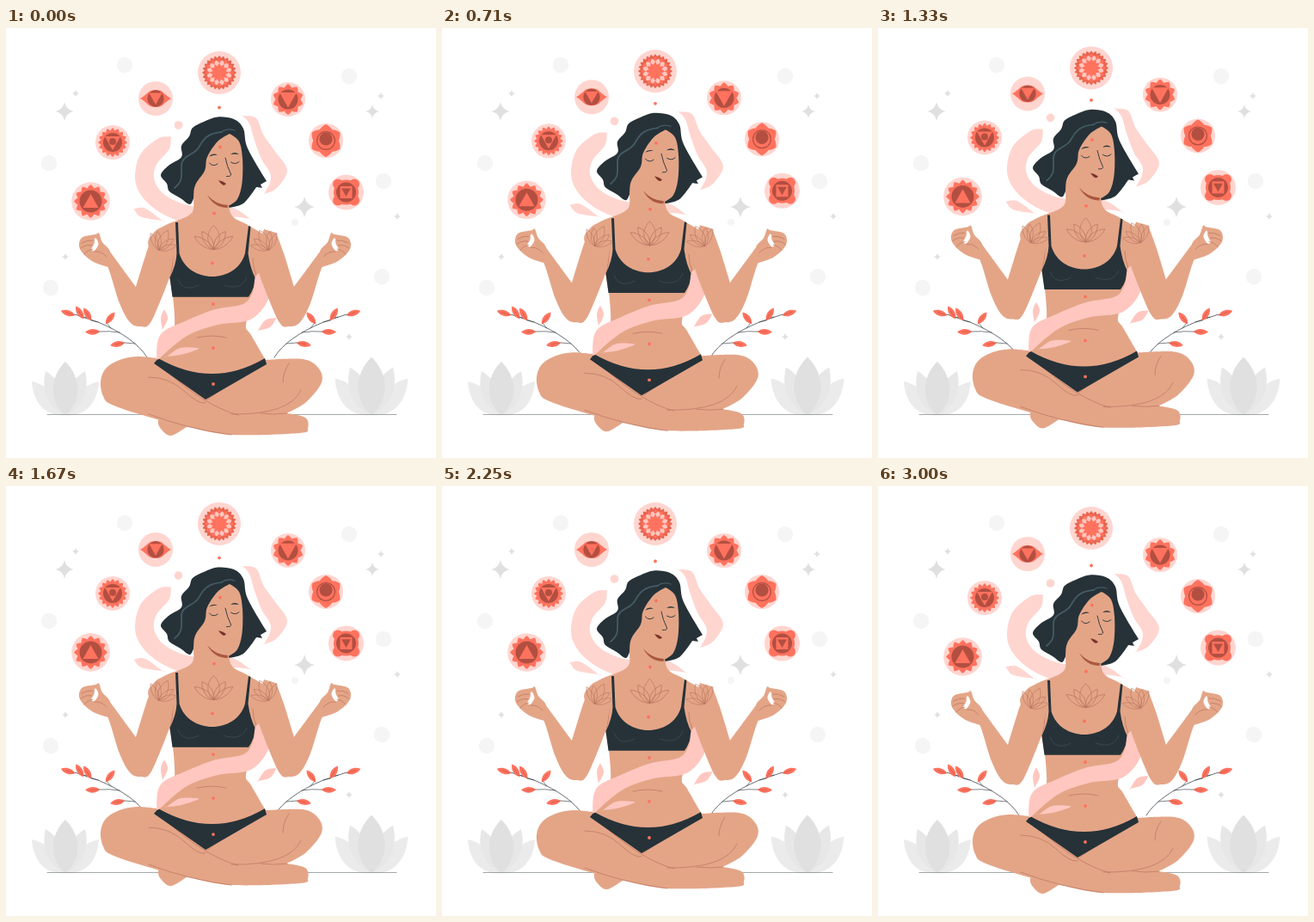
An HTML page for the animation above (3.04 s loop, 500 by 500 pixels).

```html
<!DOCTYPE html>
<html lang="en">
<head>
<meta charset="utf-8">
<title>Meditation</title>
<style>
html, body { margin: 0; width: 100%; height: 100%; overflow: hidden; background: #fff; }
svg { display: block; width: 100vw; height: 100vh; }
</style>
</head>
<body>
<svg id="stage" viewBox="0 0 500 500"></svg>
<script>
const SKIN = '#e4a587', LINE = '#b97560', DARK = '#263238', CORAL = '#ff725e',
      DEEP = '#b24f41', PALE = '#ffd5cf', PINK = '#ffc7bf';

const parse = text => text.trim().split(/\s+/).map(s => s.split(',').map(parseFloat));
const path = (d, fill) => `<path d="${d}" fill="${fill}"/>`;
const stroke = (d, color = LINE, w = 0.7) =>
  `<path d="${d}" fill="none" stroke="${color}" stroke-width="${w}" stroke-linecap="round" stroke-linejoin="round"/>`;
const dot = (x, y, r, fill) => `<circle cx="${x}" cy="${y}" r="${r}" fill="${fill}"/>`;
const put = (x, y, body, extra = '') => `<g transform="translate(${x} ${y}) ${extra}">${body}</g>`;
const mirrored = (body, axis = 0) => body + put(axis * 2, 0, body, 'scale(-1 1)');
const times = (n, fn) => Array.from({ length: n }, (_, i) => fn(i)).join('');

// Closed smooth curve; a third value of 1 makes the point a corner.
function smooth(pts) {
  const n = pts.length, at = i => pts[(i + n) % n];
  const tan = (i, k) => at(i)[2] ? 0 : (at(i + 1)[k] - at(i - 1)[k]) / 6;
  let d = `M${pts[0][0]} ${pts[0][1]}`;
  for (let i = 0; i < n; i++) {
    const [ax, ay] = at(i), [bx, by] = at(i + 1);
    d += 'C' + [ax + tan(i, 0), ay + tan(i, 1), bx - tan(i + 1, 0), by - tan(i + 1, 1), bx, by]
      .map(v => v.toFixed(2)).join(' ');
  }
  return d + 'Z';
}
const blob = (text, fill) => path(smooth(parse(text)), fill);

// Flowing band along a spine of x,y,half-width points.
function ribbon(text, fill) {
  const spine = parse(text), last = spine.length - 1;
  const side = k => spine.map(([x, y, h], i) => {
    const a = spine[Math.max(0, i - 1)], b = spine[Math.min(last, i + 1)];
    const dx = b[0] - a[0], dy = b[1] - a[1], len = Math.hypot(dx, dy);
    return [x - k * h * dy / len, y + k * h * dx / len];
  });
  return path(smooth([...side(1), ...side(-1).reverse()]), fill);
}

// Pointed petal from r0 out to r1, turned clockwise from straight up.
function petalPath(r0, r1, w) {
  const a = r0 + (r1 - r0) * 0.25, b = r0 + (r1 - r0) * 0.7;
  return `M0 ${-r0}C${-w} ${-a} ${-w} ${-b} 0 ${-r1}C${w} ${-b} ${w} ${-a} 0 ${-r0}Z`;
}
const turn = (deg, body) => `<g transform="rotate(${deg})">${body}</g>`;
const petals = (n, r0, r1, w, fill, phase = 0) =>
  times(n, i => turn(phase + i * 360 / n, path(petalPath(r0, r1, w), fill)));
const triangle = (r, y, fill, down) => {
  const s = down ? -1 : 1;
  return path(`M0 ${y - s * r}L${r * 0.9} ${y + s * r * 0.6}H${-r * 0.9}Z`, fill);
};

// Scenery
const star = (x, y, r) => put(x, y, path(
  `M0 ${-r}Q${r * .16} ${-r * .16} ${r} 0Q${r * .16} ${r * .16} 0 ${r}Q${-r * .16} ${r * .16} ${-r} 0Q${-r * .16} ${-r * .16} 0 ${-r}Z`, '#e0e0e0'));
const lotus = (x, s) => put(x, 450,
  mirrored(path('M0 0C22 2 37 -12 39 -39Q28 -37 19 -29Z', '#ebebeb') + path('M0 0C22 -10 28 -30 23 -51Q12 -45 5 -32Z', '#e7e7e7')) +
  path(petalPath(0, 62, 19), '#e0e0e0'), `scale(${s})`);
const leaf = (x, y, deg) => put(x, y, path(petalPath(0, 17, 4.5), CORAL) + stroke('M0 0V-11', DEEP, 0.5), `rotate(${deg})`);
const twig = stroke('M164 383Q150 360 107 342L80 333', DARK) +
  stroke('M132 354Q120 352 109 353M150 367L138 366M107 342L99 340M94 337L90 336M122 349L117 343', DARK, 0.6) +
  leaf(80, 334, -72) + leaf(99, 340, -31) + leaf(116, 344, 38) + leaf(109, 353, -92) + leaf(138, 366, -100);

const backdrop =
  [[138, 43], [50, 157], [399, 56], [439, 178], [437, 289], [52, 302]].map(([x, y]) => dot(x, y, 9.2, '#f5f5f5')).join('') +
  dot(336, 226, 4, '#f5f5f5') +
  star(68, 97, 11) + star(426, 97, 8) + star(347, 208, 12) +
  [[81, 76], [436, 79], [455, 219], [399, 359], [69, 266]].map(([x, y]) => star(x, y, 4.3)).join('') +
  lotus(69, 1) + lotus(425, 1.09) + stroke('M48 449.5H454', '#7b8387') +
  mirrored(twig, 238) + leaf(90, 338, -31);

// Medallions
const medallion = (x, y, r, art) => put(x, y, dot(0, 0, r, PALE) + art);
const rings =
  medallion(248, 52, 25, petals(24, 8, 20, 4, '#e8644f') + dot(0, 0, 16.5, '#e8644f') +
    petals(12, 6, 17, 4.5, CORAL) + petals(12, 6, 15, 3.6, PINK, 15) + petals(12, 0, 11, 3, CORAL) + dot(0, 0, 6.5, CORAL)) +
  medallion(174, 82, 20, path('M-18 0C-9 -5 -9 -10 0 -10S9 -5 18 0C9 5 9 10 0 10S-9 5 -18 0Z', CORAL) +
    dot(0, 0, 9.7, DEEP) + triangle(8.5, -1.5, CORAL, true)) +
  medallion(328, 83, 20, petals(10, 3, 18, 7, CORAL) + dot(0, 0, 11.5, DEEP) + triangle(11, -1.5, CORAL, true)) +
  medallion(124, 133, 20, petals(16, 4, 17, 4.5, CORAL) + dot(0, 0, 11, DEEP) + triangle(10, -1, CORAL, true) + dot(0, -1, 4, DEEP)) +
  medallion(372, 131, 20, petals(6, 0, 19, 11, CORAL) + dot(0, 0, 12.5, CORAL) + dot(0, 0, 11, DEEP) + dot(0, 0, 9.8, CORAL) + dot(0, -2, 7.6, DEEP)) +
  medallion(98.5, 201.5, 22.3, petals(12, 2, 19.5, 7, CORAL) + dot(0, 0, 13, DEEP) + triangle(10, 1.5, CORAL)) +
  medallion(395.5, 191, 20.5, times(4, i => turn(i * 90, dot(9.5, 9.5, 6, CORAL))) + dot(0, 0, 14.5, CORAL) +
    dot(0, 0, 11.5, DEEP) + path('M-7 -7H7V7H-7Z', CORAL) + triangle(6, -1, DEEP, true));

// Figure
const smoke =
  ribbon('191,127,1 183,135,9 165,154,11 162,180,11 180,203,10 215,217,10 260,214,6 284,222,0', PALE) +
  ribbon('275,102,0 287,108,5 294,127,6 305,148,9 317,167,10 311,183,5 300,193,0', PALE) +
  ribbon('150,211,1 160,215,5.5 182,224,0', PALE) + dot(200.5, 113, 4.8, PALE);

const legs =
  blob('184,452 177,457 180,466 192,474 211,463,1', SKIN) +
  blob('176,384,1 152,382 132,386 116,396 110,411 113,428 123,438 165,452 212,464 262,473 341,471 351,465 348,453 326,448,1 349,435 367,412 363,395 345,385 302,386,1', SKIN) +
  stroke('M166 406Q190 406 207 422T232 436M186 398Q232 440 270 450M166 449Q210 466 262 473M262 449Q330 450 343 421M322 412Q322 400 329 390M302 391Q260 412 234 432M327 448Q312 450 296 448');

const torso =
  blob('219,190,1 216,215 186,229 172,238 166,254 190,290,1 194,312,1 196,347 187,364 174,388,1 232,425,1 303,388,1 285,357 279,345 290,312,1 292,288,1 315,262 308,246 281,229 262,217 258,190,1', SKIN) +
  stroke('M222 360Q240 356 256 360M194 264Q194 281 190 290M291 288Q287 278 287 268');

const clothes =
  path('M177 384Q240 420 301 384L303 391 232 432 172 390Z', DARK) +
  path('M197 226h3l1.5 36C212 298 268 298 278 262L282 230l2.5 1-3 31Q284 280 290 291 289 303 282 312.7H193.5L190.5 290Q198 275 198.5 262Z', DARK) +
  stroke('M200 292Q206 308 224 299M253 299Q274 306 280 290', '#45555d', 0.6);

const sash =
  ribbon('298,288,7 296,311,10 280,330,10 245,336,9 212,348,8 187,363,10 177,383,2', PINK) +
  ribbon('187,382,0 203,376,4 222,373,1', PINK) +
  ribbon('184,329,1 184,338,4 182,351,0', PINK) +
  ribbon('293,352,0 304,344,5 313,338,1', PINK);

const arm =
  blob('172,238,1 163,262 151,301,1 118,256,1 107,268,1 118,277 132,320 144,342 156,347 169,341 191,288,1 195,262,1 186,234,1', SKIN) +
  blob('108,238.5 112,249 121,260 119,278,1 100,271 86,257 88,244 104,240', SKIN) +
  ribbon('104,245,1 105,251,2.5 101,258,2', '#fff') +
  stroke('M88 250Q95 246 101 247M87 256Q94 251 100 253M91 263Q95 258 101 257M103 260Q111 259 117 266');

const openPetal = (deg, len, w) => put(0, 13, stroke(petalPath(0, len, w)), `rotate(${deg})`);
const flower = openPetal(0, 28, 9) + mirrored(openPetal(33, 25, 6) + openPetal(56, 27, 5));
const tattoos = put(241.5, 244.5, flower) +
  mirrored(put(182.5, 247.5, flower, 'rotate(25) scale(.75 .9)'), 241.5);

const hair = blob('246,103.5 265,106 276,117 281,140 303,178,1 296,182,1 298,186,1 291,185,1 276,204 258,209,1 219,195,1 214,205 203,198 190,190 187,181 180,171 189,160 204,150 204,137 213,126 217,116 230,109', DARK);
const head =
  blob('260,123,1 271,132 275,152 274.5,180 269,199 258,207,1 258,218,1 219,218,1 219,186 231,166 234,150 246,132', SKIN) +
  path('M234 194Q243 205 258 206L257.5 209Q242 209 234 194Z', '#a9583f') +
  stroke('M251 121C234 122 229 130 224 139S204 148 204 160 206 178 196 186', '#455a64', 1.8) +
  stroke('M250 121Q257 116 266 119', '#455a64', 1.3) +
  stroke('M236.5 157Q241 162 246 158M261.5 156Q267 159.500 271 155.500M255 151Q257 161 261.500 170 262 173 256.500 172.500', DARK, 0.9) +
  path('M236 149.500Q240 145 246 147.500 241 147.500 236 149.500ZM261 147Q266 143 271 147 266 146 261 147Z', DARK) +
  path('M247 177Q252 178 256 181 253 186 247 177Z', '#7a3329');

const points = [[248, 92.5], [249, 138.5], [242, 215.5], [240, 273.5], [241, 321], [241, 372], [241, 414]]
  .map(([x, y]) => dot(x, y, 1.9, CORAL)).join('');

document.getElementById('stage').innerHTML = backdrop +
  `<g id="figure">${smoke}${legs}${hair}${torso}${clothes}${sash}${mirrored(arm, 243)}${tattoos}${head}${points}</g>` +
  `<g id="rings">${rings}</g>`;

// Both groups drift up and down 10 px; the medallions begin later.
const LOOP = 3040, CYCLE = 3000, DELAY = 450, FRAME = 1000 / 24;
const figure = document.getElementById('figure'), ringGroup = document.getElementById('rings');
const lift = t => t <= 0 || t >= CYCLE ? 0 : -10 * (1 - Math.abs(1 - t / (CYCLE / 2)));
const start = performance.now();
function draw(now) {
  const time = Math.max(0, now - start) % LOOP;
  const t = Math.floor(time / FRAME + 0.05) * FRAME;
  figure.setAttribute('transform', `translate(0 ${lift(t).toFixed(3)})`);
  ringGroup.setAttribute('transform', `translate(0 ${lift(t - DELAY).toFixed(3)})`);
  requestAnimationFrame(draw);
}
draw(start);
</script>
</body>
</html>
```
